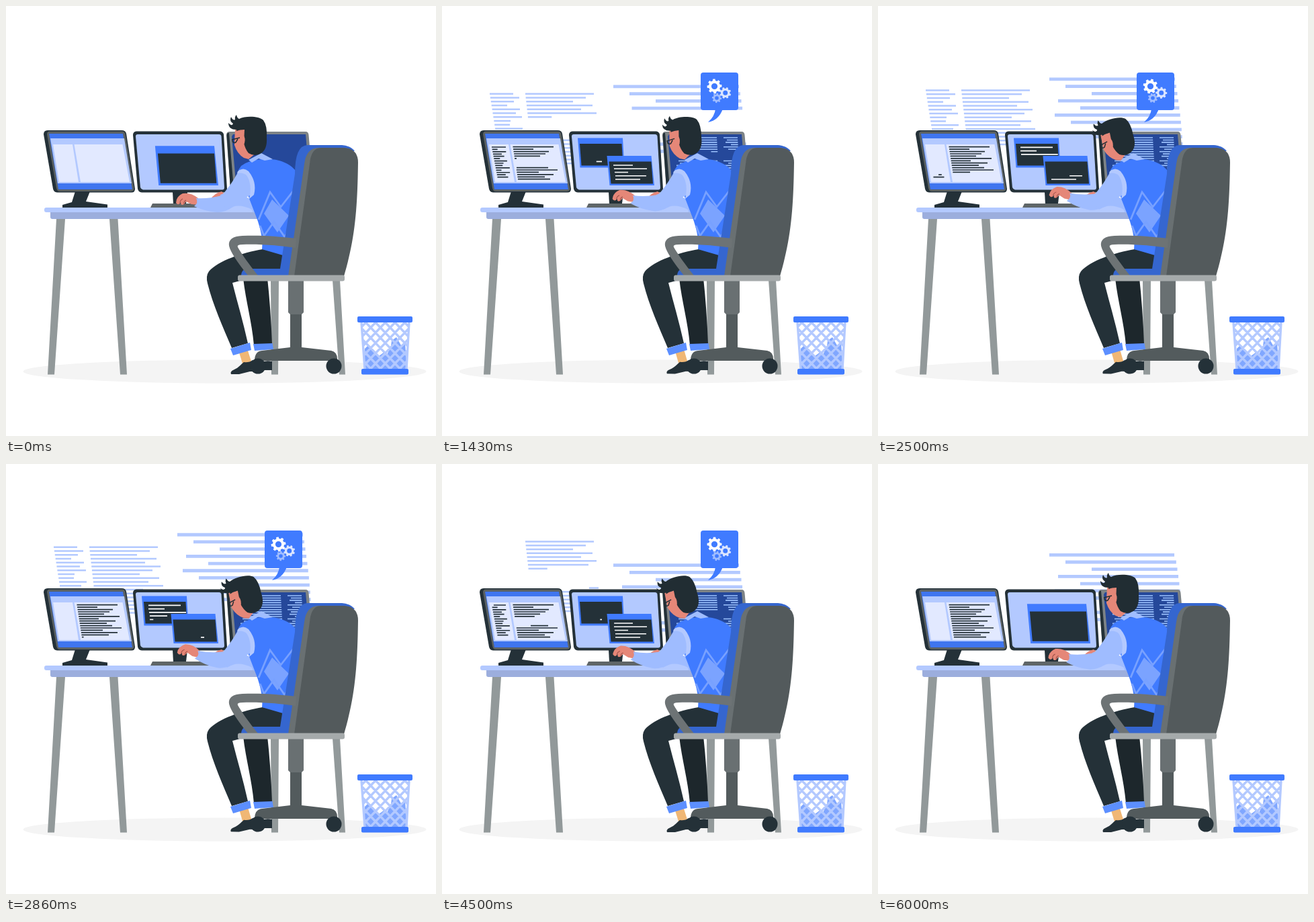
An HTML page for the animation above (6070 ms loop, 640 by 640 pixels).

```html
<!DOCTYPE html>
<html lang="en">
<head>
<meta charset="utf-8">
<title>Programmer at work</title>
<style>
html, body { margin: 0; width: 100%; height: 100%; overflow: hidden; background: #fff; }
svg { display: block; width: 100vw; height: 100vh; }
</style>
</head>
<body>
<svg viewBox="0 0 640 640">
  <ellipse cx="325.500" cy="544" rx="300" ry="17.500" fill="#f4f4f4"/>
  <g fill="none" stroke="#b3c9ff">
    <path id="wallA" stroke-width="2.500"/>
    <path id="wallB" stroke-width="2.500"/>
    <path id="wallC" stroke-width="4.800"/>
  </g>

  <!-- right monitor -->
  <path d="M333 187H446Q450 187 450.500 192L458 277H338Q335 277 334 272L328 192Q328 187 333 187Z" fill="#7d8386"/>
  <path d="M328.500 193Q329 188 332 189L338 260 340 277Q335 277 334 272Z" fill="#243138"/>
  <path d="M338 191H446L453 272H343L336 194Z" fill="#25489a"/>
  <g fill="none" stroke="#9cc2ff" stroke-width="1.600"><path id="darkA"/><path id="darkB"/></g>

  <!-- desk -->
  <path d="M75 317H88L72 548.500H62ZM154 317H166.500L180 548.500H170ZM394 408H406L405 548.500H395ZM486 408H497L505 548.500H496Z" fill="#92999a"/>
  <rect x="66" y="304" width="315" height="13" rx="3" fill="#9caedd"/>
  <rect x="57" y="300" width="325" height="7" rx="3" fill="#b3c9ff"/>

  <!-- left monitor -->
  <path d="M103 276H125L119 291 151 295.500V300H84V296L98 292Z" fill="#243138"/>
  <path d="M62 185H172Q178 185 179 190L192 272Q192 277.500 187 277.500H76Q71 277 70 272L56 191Q56 185 62 185Z" fill="#243138"/>
  <path d="M65 186.500H172Q176.500 186.500 177.500 190.500L190.500 271Q191 276 186 276H80Q76 276 75 271L61 191Q61 186.500 65 186.500Z" fill="#5a6163"/>
  <path d="M64 190H174L188 273H78Z" fill="#3f75ef"/>
  <path d="M66 197H176L187 264H77Z" fill="#b3c9ff"/>
  <path d="M70 206H99L108 262H79ZM101.500 206H173.500L184 262H111Z" fill="#e2e9ff"/>
  <g fill="none" stroke="#243138" stroke-width="1.700"><path id="listA"/><path id="listB"/></g>

  <!-- middle monitor -->
  <path d="M248 277H270L268 294H249Z" fill="#243138"/>
  <path d="M218 294H302V300H215Z" fill="#5f6668"/>
  <path d="M194 186.500H319Q323 187 324 191L329 272Q329 277.500 324 277.500H202Q197 277 196 272L189 192Q189 187 194 186.500Z" fill="#243138"/>
  <path d="M196 191H317Q320 191 320.500 194L325 270Q325 273.500 322 273.500H204Q201 273 200 270L193 194Q193 191 196 191Z" fill="#b3c9ff"/>
  <g id="backWin">
    <path d="M202 196.500H269L271.500 240.500H205.500Z" fill="#407bff"/>
    <path d="M205 205H267.500L269.500 237.500H207.500Z" fill="#243138"/>
    <path id="backText" fill="none" stroke="#fff" stroke-width="1.700"/>
  </g>
  <g id="frontWin">
    <path d="M245.500 223H311.500L316 267H249.500Z" fill="#407bff"/>
    <path d="M248.500 231.500H311.500L314 264.500H251.500Z" fill="#243138"/>
    <path id="frontText" fill="none" stroke="#fff" stroke-width="1.700"/>
  </g>

  <!-- waste bin -->
  <path d="M533 541L534 510 539 505 547 515 555 521 563 515 567 519 573 506 574 498 581 493 588 505 594 501 597 541Z" fill="#80a7ff"/>
  <path id="mesh" fill="none" stroke="#b3c9ff" stroke-width="3.400"/>
  <rect x="523" y="462" width="82" height="9" rx="2" fill="#407bff"/>
  <rect x="529" y="540" width="70" height="8.500" rx="2" fill="#407bff"/>

  <!-- legs -->
  <path d="M353 405H389Q394 450 396 503L369 505C366 470 357 440 353 405Z" fill="#1d272c"/>
  <path d="M368 503L396.500 502 398 511 370 513Z" fill="#5c8fff"/>
  <path d="M378 531Q386 527 396 529V542H380Z" fill="#243138"/>
  <g id="foot">
    <path d="M347 516L360 513 365 529 352 532Z" fill="#f0b775"/>
    <path d="M335 548Q333 544 339 541.500C347 538 350 533 354 530Q362 531 367 527L378 533V544L363 544 347 548Z" fill="#243138"/>
  </g>
  <path d="M382 362C352 367 316 379 302 395Q297 402 300 413C308 445 323 478 336 509L360 502C353 470 344 440 337 412L352 408 416 394V366Z" fill="#243138"/>
  <path d="M334 510L363 501 365 512 338 520Z" fill="#5c8fff"/>

  <!-- far arm -->
  <path d="M304 288Q311 278 321 276L327 281 318 289Z" fill="#e58778"/>
  <path d="M319 281Q335 273 350 280L368 290 371 308Q350 300 336 304L320 291Z" fill="#9fbcff"/>
  <path d="M329 303Q345 292 366 303L367 307H333Z" fill="#b3c9ff"/>

  <!-- body -->
  <path d="M350 238Q362 229 380 228C398 227 418 229 433 247V371H412L381 362C383 345 377 325 371 310L361 284Q352 260 346 244Z" fill="#407bff"/>
  <path d="M396 288L421 312 404 337 384 309Z" fill="#7ba3ff"/>
  <g fill="none" stroke="#78a1ff" stroke-width="2.800">
    <path d="M376 318L393 277 409 299 430 272M378 327L384 342 399 321 415 344 426 322"/>
  </g>
  <path d="M361 229L380 219 397 228 385 230 376 227 366 233Z" fill="#a0bdff"/>

  <g id="head">
    <path d="M341 184Q340 201 340 207Q344 220 354 226L361 228 372 219 368 184Z" fill="#e58778"/>
    <path d="M343 184Q331 184 331 174Q336 180 338 175Q332 171 335 165Q338 171 341 169Q340 165 343 162Q344 167 347 168C357 163 377 164 383 170Q389 178 388 196Q389 213 380 219Q371 225 361 219Q356 213 354 204L355 184Q348 184 343 186Z" fill="#212d33"/>
    <path d="M347 198Q348 190 353 192Q357 196 355 204Q351 212 347 208Z" fill="#e58778"/>
    <path d="M336 199L348 196M337 199Q337 205 342 203L345 198" fill="none" stroke="#212d33" stroke-width="1.500"/>
  </g>

  <!-- near arm -->
  <g id="forearm">
    <path d="M286 286Q275 277 263 279Q253 284 253 293Q257 298 260 292Q260 298 265 295L268 291 276 295 287 296Z" fill="#e58778"/>
    <path d="M259 293Q259 289 263 287M265 295Q264 291 268 289" fill="none" stroke="#9d514b" stroke-width="1"/>
    <path d="M283 286Q303 287 321 282L344 286 338 299Q324 308 314 307Q297 306 280 298Q287 293 283 286Z" fill="#9fbcff"/>
  </g>
  <path d="M347 244Q359 243 364 253Q372 267 368 279C355 286 339 298 329 303L316 288Q336 266 347 244Z" fill="#9fbcff"/>
  <path d="M345 246Q353 239 361 246Q374 262 369 281L362 287Q367 265 358 252Q353 247 344 249Z" fill="#b3c9ff"/>

  <!-- chair -->
  <path d="M350 402Q350 391 361 391H408L430 250Q430 207 449 207H500Q513 208 519 216H462L432 402Z" fill="#3566cf"/>
  <path d="M420 402L444 235Q447 211 465 211H480L442 402Z" fill="#697072"/>
  <path d="M429 402L452 235Q454 211 469 211H504Q524 213 524 233C523 300 520 345 503 402Z" fill="#535a5c"/>
  <path d="M432 346C400 342 375 341 352 342Q330 343 332 357Q335 370 360 401H375C362 385 350 368 345 359Q343 355 352 355C380 354 410 357 431 360Z" fill="#6d7375"/>
  <path d="M370 528Q370 514 381 513L423 508V455H440V508L484 513Q494 515 493 528Z" fill="#535b5d"/>
  <path d="M420 405H443V456L440 459H423L420 456Z" fill="#697072"/>
  <rect x="345" y="400.500" width="159" height="9" rx="3" fill="#a5aaab"/>
  <circle cx="375" cy="536" r="11.500" fill="#243138"/>
  <circle cx="488" cy="536" r="11.500" fill="#243138"/>

  <g id="bubble">
    <rect x="385" y="99" width="56" height="56" rx="4" fill="#407bff"/>
    <path d="M407 153Q406 164 396 173Q412 170 418 153Z" fill="#407bff"/>
    <path class="gear" fill="#fff" fill-rule="evenodd"/>
    <path class="gear" fill="#dce6ff" fill-rule="evenodd"/>
    <path class="gear" fill="#a0bdff" fill-rule="evenodd"/>
  </g>
</svg>
<script>
const LOOP = 6.07;
const $ = id => document.getElementById(id);
const set = (id, name, value) => $(id).setAttribute(name, value);
const clamp = v => Math.max(0, Math.min(1, v));
const ease = (t, a, b) => { const u = clamp((t - a) / (b - a)); return u * u * (3 - 2 * u); };
const mod = (a, b) => ((a % b) + b) % b;
const scaleAt = (s, x, y) => `translate(${x} ${y}) scale(${s}) translate(${-x} ${-y})`;

// Rows of text: left edge from a rule, lengths or right ends from a short list.
const rows = (n, fn) => Array.from({ length: n }, (_, i) => fn(i));
const pick = (list, i) => list[i % list.length];
const wallARows = rows(19, i => [71 + i * .9, pick([106, 115, 107, 97, 116, 110, 119, 102, 101, 120, 112, 121, 104], i)]);
const wallBRows = rows(19, i => [124 + i * .65, pick([226, 214, 195, 224, 207, 230, 218, 199, 228, 212, 234, 204, 233], i)]);
const wallCRows = rows(10, i => [pick([255, 279, 318, 268, 301, 263, 287, 372, 290, 310], i), 442 + i * 1.9 - i * i * .07]);
const listARows = rows(14, i => [74 + i * .65, 74 + i * .65 + pick([21, 8, 20, 13, 16, 9, 19, 13, 11], i)]);
const listBRows = rows(15, i => [105.5 + i * .53, pick([166, 136, 159, 154, 146, 169, 138, 163, 150, 158, 172, 144, 166, 153, 161], i)]);
const darkARows = rows(20, i => [349 + pick([0, 8, 3, 5], i), 409 + i * .2]);
const darkBRows = rows(20, i => [pick([419, 424, 422, 430, 419, 426], i), 440 + i * .2]);
const backRows = [[212, 260], [212, 236], [213, 268], [214, 240], [214, 238]];
const frontRows = [[255, 284], [256, 305], [257, 277], [258, 304], [258, 295]];

// span(i) gives the visible part of row i as two fractions of its length.
function draw(id, list, y, dy, span) {
  let d = '';
  list.forEach(([x0, x1], i) => {
    const [a, b] = span(i), w = x1 - x0;
    if (b > a) d += `M${(x0 + w * a).toFixed(2)} ${(y + i * dy).toFixed(2)}H${(x0 + w * b).toFixed(2)}`;
  });
  set(id, 'd', d);
}

// A wiping front runs down the rows, a typing front follows after a lag.
const rewrite = (t, rate, lag, fromRight) => i => {
  const wiped = clamp(rate * t - i), typed = clamp(rate * (t - lag) - i);
  if (fromRight) return typed > 0 ? [1 - typed, 1] : [0, 1 - wiped];
  return typed > 0 ? [0, typed] : [wiped, 1];
};
const typeThenWipe = (t, rate, wipeAt) => i => [clamp(rate * (t - wipeAt) - i), clamp(rate * t - i)];

function gearPath(cx, cy, r, teeth, hole, angle) {
  const step = Math.PI * 2 / teeth;
  const at = (rad, a) => `${(cx + rad * Math.cos(a)).toFixed(2)} ${(cy + rad * Math.sin(a)).toFixed(2)}`;
  const points = [];
  for (let k = 0; k < teeth; k++) {
    const a = angle + k * step;
    points.push(at(r * .78, a - step * .3), at(r, a - step * .2), at(r, a + step * .2), at(r * .78, a + step * .3));
  }
  return `M${points.join('L')}ZM${cx - hole} ${cy}a${hole} ${hole} 0 1 0 ${hole * 2} 0a${hole} ${hole} 0 1 0 ${-hole * 2} 0Z`;
}

function buildMesh() {
  let d = 'M529 471L534 541M600 471L596 541';
  const left = y => 529 + (y - 471) * .07, right = y => 600 - (y - 471) * .06;
  const strand = (x, dir) => {
    const pts = [];
    for (let y = 471; y <= 541; y += 1) {
      const px = x + dir * (y - 471) * .95;
      if (px >= left(y) && px <= right(y)) pts.push([px, y]);
    }
    if (pts.length > 1) d += `M${pts[0]}L${pts[pts.length - 1]}`;
  };
  for (let x = 463; x < 602; x += 14.5) {
    strand(x, 1);
    strand(1129 - x, -1);
  }
  set('mesh', 'd', d);
}

function drawCode(t) {
  const on = t >= .069 ? 1 : 0;
  const beat = t % 3;
  const wallY = 138 - 5 * t;
  const wave = mod(t - .02, 2.95);
  const leftFade = on * ease(t, 0, .25) * (1 - ease(t, 5.25, 5.75));
  set('wallA', 'opacity', on);
  set('wallB', 'opacity', leftFade);
  draw('wallA', wallARows, wallY, 5.75, i =>
    [1 - clamp(8.4 * t - i), 1 - clamp(8.6 * (t - 2.95) - i)]);
  draw('wallB', wallBRows, wallY, 5.75, rewrite(wave, 8.4, .65, false));

  const second = t > 3.72;
  set('wallC', 'opacity', on * (second ? ease(t, 3.72, 4) : 1 - ease(t, 3.3, 3.7)));
  draw('wallC', wallCRows, 134.6 - 10.25 * (second ? t - LOOP : t), 10.7, rewrite(beat, 5.05, .655, true));

  const endless = t >= 5.99;
  const full = () => [0, 1];
  for (const id of ['listA', 'listB', 'darkA', 'darkB']) set(id, 'opacity', on);
  draw('listA', listARows, 210, 3.43, endless ? () => [0, 0] : typeThenWipe(beat, 12.5, 1.49));
  draw('listB', listBRows, 209.7, 3.43, endless ? full : rewrite(beat, 6.3, .63, false));
  const dark = endless ? full : rewrite(beat, 7, .55, true);
  draw('darkA', darkARows, 196, 3.45, dark);
  draw('darkB', darkBRows, 196, 3.45, dark);

  draw('backText', backRows, 210.3, 5.3, i => {
    const b = mod(t - .02, 3), typed = clamp(3.4 * (b - 1.6) - i);
    return typed > 0 ? [0, typed] : [clamp(3.3 * b - i), b < 1.6 ? 1 : 0];
  });
  draw('frontText', frontRows, 237, 5.25, endless || !on ? () => [0, 0] : typeThenWipe(beat + .04, 3.55, 1.53));
}

function render(t) {
  drawCode(t);

  const open = ease(t, .03, .55) * (1 - ease(t, 5.3, 5.85));
  set('frontWin', 'transform', scaleAt(1.335 - .335 * open, 316, 267));
  set('backWin', 'transform', scaleAt(open, 237, 218.5));
  set('backWin', 'visibility', open > .01 ? 'visible' : 'hidden');

  const pop = ease(t, .35, .85) * (1 - ease(t, 5.72, 5.95));
  set('bubble', 'transform', scaleAt(pop, 413, 128));
  set('bubble', 'visibility', pop > .01 ? 'visible' : 'hidden');
  const turn = t * Math.PI / 3;
  const gears = document.querySelectorAll('.gear');
  gears[0].setAttribute('d', gearPath(405.5, 119.5, 11, 8, 4.6, turn));
  gears[1].setAttribute('d', gearPath(421.7, 129.3, 8.6, 8, 3.5, -turn + .3));
  gears[2].setAttribute('d', gearPath(409, 137, 7.2, 8, 2.8, turn + .2));

  const nod = ease(t, 1.25, 1.8) * (1 - ease(t, 5.2, 5.75));
  set('head', 'transform', `rotate(${-14.5 * nod} 368 226)`);

  const lift = (1 - Math.cos(t / LOOP * Math.PI * 36)) / 2;
  set('forearm', 'transform', `rotate(${8 * lift} 342 300)`);

  const tapping = t < 3.21 || t > 5.2;
  const tap = tapping ? Math.sin((t < 3.21 ? t / 3.21 * 3 : (t - 5.2) / .87) * Math.PI) ** 2 : 0;
  set('foot', 'transform', `rotate(${1.5 * tap} 370 540)`);
}

buildMesh();
const start = performance.now();
function tick() {
  render(((performance.now() - start) / 1000) % LOOP);
  requestAnimationFrame(tick);
}
tick();
</script>
</body>
</html>
```
